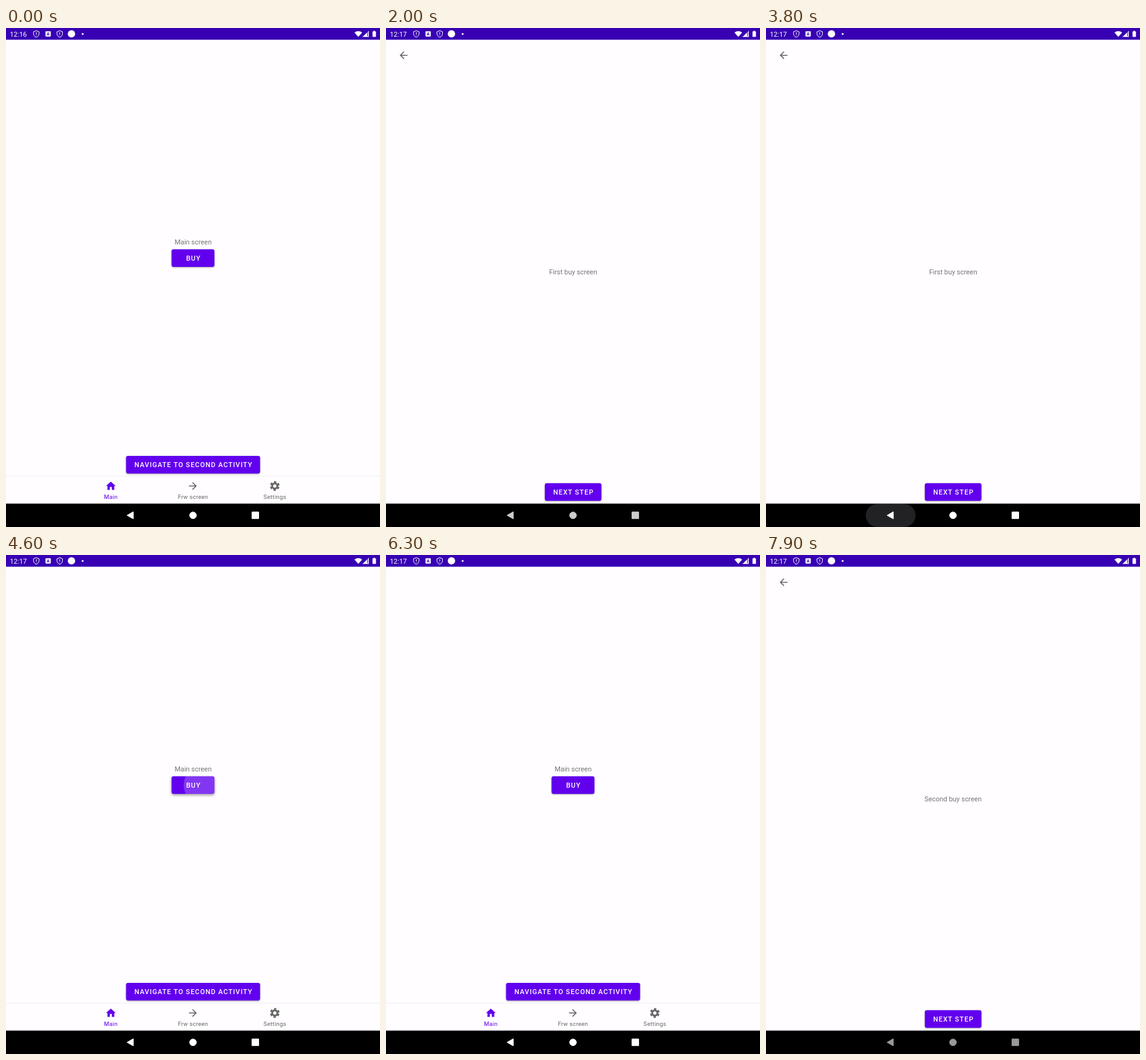
Animation, 600 px wide and 800 px high, one loop 8000 ms. Source, as an HTML page:

```html
<!DOCTYPE html>
<html lang="en">
<head>
<meta charset="utf-8">
<title>Screen navigation demo</title>
<style>
  html, body { margin: 0; width: 100%; height: 100%; overflow: hidden; background: #fffdff; }
  svg { display: block; width: 600px; height: 800px; font-family: Roboto, sans-serif; }
  text { text-anchor: middle; }
  .body { font-size: 10.94px; fill: #757575; }
  .button text { font-size: 10.94px; font-weight: 500; letter-spacing: .977px; fill: #fff; }
  .button .face { fill: #6200ee; filter: drop-shadow(0 1.3px 1.2px rgba(0, 0, 0, .36)); }
  .tab { font-size: 9.375px; letter-spacing: .31px; fill: #666; }
  .tab.active { fill: #6200ee; }
</style>
</head>
<body>
<svg viewBox="0 0 600 800">
  <rect width="600" height="800" fill="#fffdff"/>

  <g id="statusBar" fill="#fff">
    <rect width="600" height="18.75" fill="#3700b3"/>
    <text id="clock" x="6.2" y="13.5" font-size="10.94" style="text-anchor:start"></text>
    <g id="shield">
      <path d="M48.6 4.3L53 6V9.4C53 12 51.1 13.9 48.6 14.7C46.1 13.9 44.2 12 44.2 9.4V6Z" fill="none" stroke="#fff"/>
      <path d="M48.1 6.7h1v3.2h-1zM48.1 10.7h1v1.1h-1z"/>
    </g>
    <use href="#shield" x="37.6"/>
    <rect x="63.4" y="5.2" width="8.4" height="8.6" rx="1"/>
    <text x="67.6" y="11.9" font-size="6.8" font-weight="700" fill="#3700b3">A</text>
    <circle cx="105" cy="9.4" r="5.9"/>
    <circle cx="123" cy="9.4" r="1.5"/>
    <path d="M559 7.2Q565.2 2.6 571.4 7.2L565.2 14.3Z"/>
    <path d="M572.3 14.2L582 4.6V14.2Z" opacity=".45"/>
    <path d="M572.3 14.2L579 7.6V14.2ZM581 5.6L582 4.6V14.2H572.3V13.3H581Z"/>
    <path d="M588 5.5h1.6V4.5h2.3v1h1.6v8.8H588z"/>
  </g>

  <g id="main">
    <text class="body" x="300.2" y="346.9">Main screen</text>
    <g class="button" id="buy"></g>
    <g class="button" id="navigate"></g>
    <rect y="717.9" width="600" height="1" fill="#f0eef0"/>
    <g transform="translate(168.2 734.2) scale(.78125)" fill="#6200ee">
      <path d="M-2 8V2H2V8H7V0H10L0-9-10 0H-7V8Z"/>
    </g>
    <g transform="translate(299.8 734.2) scale(.78125)" fill="#666">
      <path id="arrow" d="M0-8l-1.41 1.41L4.17-1H-8v2H4.17l-5.58 5.59L0 8l8-8z"/>
    </g>
    <g transform="translate(431.2 734.2) scale(.78125)" fill="none" stroke="#666">
      <circle r="5.4" stroke-width="3.8"/>
      <circle r="8.3" stroke-width="3.4" pathLength="12" stroke-dasharray="1.06 .94" transform="rotate(14)"/>
    </g>
    <text class="tab active" x="168.2" y="754.6">Main</text>
    <text class="tab" x="300" y="754.6">Frw screen</text>
    <text class="tab" x="431.4" y="754.6">Settings</text>
  </g>

  <g id="step">
    <circle id="backRipple" cx="28.5" cy="43.7" fill="#f0eef0"/>
    <use href="#arrow" transform="translate(28.3 43.7) scale(-.78125 .78125)" fill="#666"/>
    <text class="body" id="stepTitle" x="300.2" y="395"></text>
    <g class="button" id="next"></g>
  </g>

  <rect y="762.5" width="600" height="37.5"/>
  <rect id="highlight" x="160" y="763" width="80" height="37" rx="18.5" fill="#222123"/>
  <g id="navIcons" fill="#fff" stroke="#fff" stroke-linejoin="round">
    <path d="M194.2 781.3L204.2 775.6V787Z"/>
    <circle cx="300" cy="781.3" r="5.4"/>
    <rect x="394.6" y="775.9" width="10.8" height="10.8"/>
  </g>
</svg>
<script>
const $ = id => document.getElementById(id);
const LOOP = 8000, STEP = 100, PRESS = 150;

const screens = [
  [0, 'main'], [1400, 'First'], [2300, 'Second'], [3200, 'First'], [3900, 'main'],
  [4700, 'First'], [6200, 'main'], [6500, 'First'], [7300, 'Second']
];
const buyPresses = [1250, 4550, 6350];
const nextPresses = [2150, 7150];
const backPresses = [3100, 3800];

function makeButton(id, label, x, y, width) {
  const box = `x="${x}" y="${y}" width="${width}" height="28.1" rx="3.1"`;
  $(id).innerHTML = `<clipPath id="${id}Clip"><rect ${box}/></clipPath>
    <rect class="face" ${box}/>
    <g clip-path="url(#${id}Clip)"><circle cy="${y + 14}" fill="#fff" opacity=".21"/></g>
    <text x="300.8" y="${y + 18.1}">${label}</text>`;
}
makeButton('buy', 'BUY', 265.6, 354.8, 68.8);
makeButton('navigate', 'NAVIGATE TO SECOND ACTIVITY', 192.6, 686.1, 215);
makeButton('next', 'NEXT STEP', 254.8, 729.8, 90.8);

const ramp = (t, start, duration) => Math.min(1, Math.max(0, (t - start) / duration));
const show = (id, visible) => $(id).style.display = visible ? '' : 'none';

function ripple(id, presses, t, x, growth) {
  const start = presses.find(p => t >= p && t < p + PRESS);
  const circle = $(id).querySelector('circle');
  const age = t - start;
  circle.setAttribute('cx', x);
  circle.setAttribute('r', start === undefined ? 0 : 20 + age * growth);
  $(id).querySelector('.face').style.filter =
    start === undefined ? '' : 'drop-shadow(0 2px 2px rgba(0, 0, 0, .4))';
}

// The system buttons dim when idle and brighten on touch.
function dimming(t) {
  if (t < 3060) return ramp(t, 1650, 700);
  if (t < 6370) return 1 - ramp(t, 3060, 250);
  return ramp(t, 6370, 700);
}

function draw(now) {
  const t = Math.floor(now % LOOP / STEP) * STEP;
  const screen = screens.filter(([start]) => start <= t).pop()[1];
  show('main', screen === 'main');
  show('step', screen !== 'main');
  $('stepTitle').textContent = screen + ' buy screen';
  $('clock').textContent = t < 1700 ? '12:16' : '12:17';

  ripple('buy', buyPresses, t, 318, .26);
  ripple('next', nextPresses, t, 300, .4);
  $('backRipple').setAttribute('r', t >= 5600 && t < 6200 ? 10 + 5 * ramp(t, 5600, 100) : 0);

  const press = backPresses.filter(p => p <= t).pop();
  $('highlight').setAttribute('opacity', press ? 1 - ramp(t, press + 150, 250) : 0);
  $('navIcons').setAttribute('opacity', 1 - .4 * dimming(t));
}

const origin = performance.now();
function tick() {
  draw(performance.now() - origin);
  requestAnimationFrame(tick);
}
tick();
</script>
</body>
</html>
```
